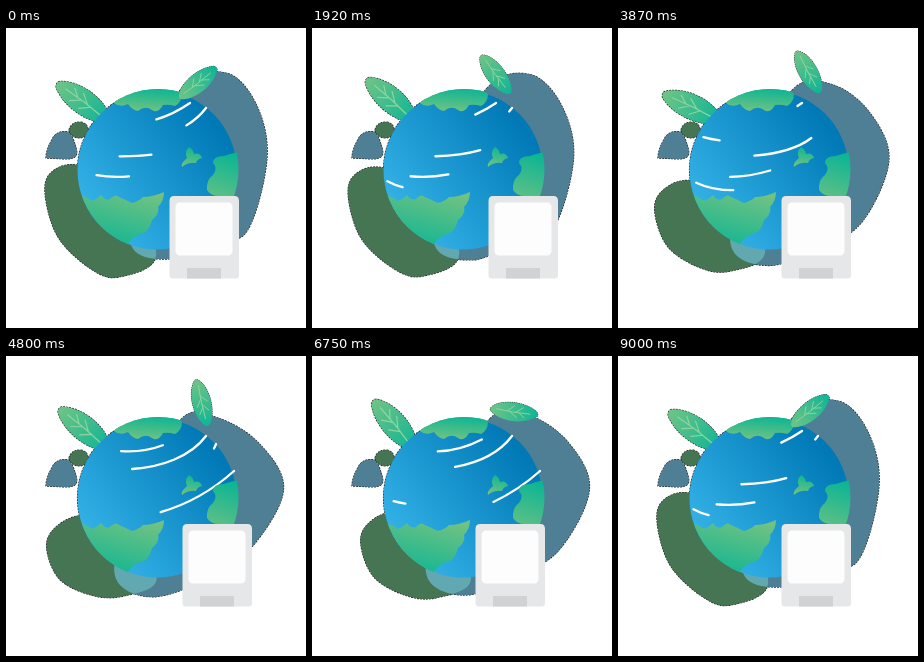
Recreate the animation shown at these times as an HTML page. Size 300 by 300 pixels, loop 9.03 s.

```html
<!DOCTYPE html>
<html lang="en">
<head>
<meta charset="utf-8">
<title>Green planet</title>
<style>
html, body { margin: 0; width: 100%; height: 100%; overflow: hidden; background: #fff; }
svg { display: block; width: 100vw; height: 100vh; }
#winds path { fill: none; stroke: #fff; stroke-width: 2.3; stroke-linecap: round; }
.vein { fill: none; stroke: #8fd49c; stroke-width: 1.2; stroke-linecap: round; stroke-dasharray: none; }
</style>
</head>
<body>
<svg viewBox="0 0 300 300">
<defs>
  <linearGradient id="sea" x1=".08" y1=".8" x2=".85" y2=".2">
    <stop stop-color="#35b3e8"/><stop offset="1" stop-color="#0079b6"/>
  </linearGradient>
  <linearGradient id="south" x1=".75" y1="0" x2=".35" y2="1">
    <stop stop-color="#70c282"/><stop offset="1" stop-color="#0bb594"/>
  </linearGradient>
  <linearGradient id="north" x1=".6" y1="0" x2=".4" y2="1">
    <stop stop-color="#0bb594"/><stop offset="1" stop-color="#70c282"/>
  </linearGradient>
  <linearGradient id="leafA" x1="0" y1="0" x2="0" y2="1">
    <stop stop-color="#6fc486"/><stop offset="1" stop-color="#0eb596"/>
  </linearGradient>
  <linearGradient id="leafB" x1="0" y1="1" x2="0" y2="0">
    <stop stop-color="#6fc486"/><stop offset="1" stop-color="#0eb596"/>
  </linearGradient>
  <clipPath id="inGreen"><path id="greenClip"/></clipPath>
  <clipPath id="inGlobe"><circle cx="152" cy="141.5" r="80.5"/></clipPath>
  <path id="leaf" d="M0 0C-13-8-16-44-3-62Q1-65 4-62C17-45 16-13 3 0Z"/>
  <path id="veins" class="vein" d="M0-8Q2-30 1-53M1-22L-7-31M1-34L-6-43M1-26L8-36M1-38L7-46"/>
</defs>

<use href="#art" stroke="#222" stroke-width="1.2" stroke-dasharray="2 1"/>

<g id="art">
  <path fill="#4f7f95" d="M40 130Q40 121 48 108Q54 102 63 104Q69 112 71 125Q70 131 60 131Z"/>
  <path fill="#457552" d="M63 102Q65 94 75 94Q82 96 82 102Q80 109 74 110Q66 110 63 102Z"/>
  <path id="blue" fill="#4f7f95"/>
  <path id="green" fill="#457552"/>
  <path id="overlap" fill="#62a8b0" clip-path="url(#inGreen)" stroke="none"/>
  <g id="leftLeaf"><use href="#leaf" fill="url(#leafA)"/><use href="#veins"/></g>
  <circle cx="151" cy="142" r="79.5" fill="url(#sea)"/>
  <g id="winds"></g>
  <g clip-path="url(#inGlobe)" stroke="none">
    <path fill="url(#south)" d="M70 167Q80 168 86 173Q91 171 95 167Q99 173 104 171Q109 165 113 169Q118 171 126 175Q133 173 137 169Q147 169 158 164Q158 173 152 179Q154 186 146 192Q144 201 138 205Q126 208 122 216V222H70Z"/>
    <g fill="url(#north)">
      <path d="M108 75Q114 80 122 76Q126 82 132 83Q139 77 146 82Q152 86 157 77Q163 76 169 78Q176 74 176 66L170 60H120Z"/>
      <path d="M233 124Q223 126 218 128Q207 128 207 135Q212 140 207 147Q200 152 201 162Q205 168 213 168Q216 172 216 182H233Z"/>
      <path d="M183 119Q187 121 188 126Q194 124 196 130Q191 131 190 135Q182 134 176 139Q174 136 181 130Q178 124 183 119Z"/>
    </g>
  </g>
  <g id="rightLeaf"><g transform="translate(0 23.5) scale(.75)"><use href="#leaf" fill="url(#leafB)"/><use href="#veins"/></g></g>
</g>

<g id="computer">
  <path fill="#e6e7e8" d="M163.500 173Q163.500 168 168 168H228.500Q233 168 233 173V247Q233 250.500 229.500 250.500H167Q163.500 250.500 163.500 247Z"/>
  <rect x="169.500" y="174.500" width="57" height="53" rx="4.500" fill="#fdfdfd"/>
  <path fill="#d1d2d4" d="M181 240H215V250.500H181Z"/>
</g>
</svg>
<script>
const LOOP = 9030, WIND = 1770, STEP = 3000, REST = 8700;
const el = id => document.getElementById(id);
const { PI, sin, cos, min, max } = Math;
const ramp = (t, from, to) => min(1, max(0, (t - from) / (to - from)));
const mix = (a, b, u) => a + (b - a) * u;
const wave = (t, peak) => cos(2 * PI * (t - peak) / LOOP);

// Each blob: resting outline, stretched outline; the last point stays behind the globe.
const blue = [
  [176,60, 220,45, 250,76, 261,130, 241,203, 205,215, 163,231, 125,217, 130,145],
  [176,64, 212,64, 255,89, 281,133, 250,187, 205,222, 145,242, 108,218, 130,145]
];
const green = [
  [75,138, 47,143, 39,165, 52,209, 85,241, 113,249, 150,228, 125,165],
  [80,162, 54,175, 45,195, 58,225, 90,239, 122,239, 155,222, 125,165]
];

// Leaf angles by time
const leftTurn = [[0,-54], [1110,-44], [2730,-54], [3870,-65], [5820,-35], [REST,-54], [LOOP,-54]];
const rightTurn = [[0,51], [1110,106], [2730,180], [3870,151], [5820,184], [6600,100], [REST,52], [LOOP,51]];

// path, start, head duration, tail duration, tail power
const winds = [
  ["M94 91Q140 105 184 75", 450, 1200, 1700, 2],
  ["M85 109C120 119 176 112 200 80", 200, 960, 1750, 2.2],
  ["M100 128C148 130 196 124 210 88", 1480, 800, 1600, 1.3],
  ["M81 145C125 157 175 140 216 110", 1300, 1600, 1600, 2.2],
  ["M75 153C113 174 180 158 228 115", 30, 1200, 1700, 2.2]
].map(([d, ...timing]) => {
  const path = document.createElementNS("http://www.w3.org/2000/svg", "path");
  path.setAttribute("d", d);
  path.setAttribute("pathLength", 100);
  el("winds").append(path);
  return [path, ...timing];
});

function eased(keys, t) {
  const i = keys.findIndex(k => k[0] > t);
  const [from, a] = keys[i - 1], [to, b] = keys[i];
  const u = ramp(t, from, to);
  return mix(a, b, (u + u * u * (3 - 2 * u)) / 2);
}

// Closed smooth curve through a flat list of points
function smooth(flat) {
  const n = flat.length / 2;
  const at = i => [flat[(i + n) % n * 2], flat[(i + n) % n * 2 + 1]];
  let d = "M" + at(0);
  for (let i = 0; i < n; i++) {
    const [a, b, c, e] = [at(i - 1), at(i), at(i + 1), at(i + 2)];
    d += "C" + [b.map((v, j) => v + (c[j] - a[j]) / 6), c.map((v, j) => v - (e[j] - b[j]) / 6), c];
  }
  return d + "Z";
}

// Stretches once per loop, slowly out and quickly back, with a sideways sway
function blob([rest, stretched], t, sway) {
  const turn = PI * ramp(t, 0, REST) ** 1.57;
  return smooth(rest.map((v, i) =>
    mix(v, stretched[i], sin(turn) ** 2) - (i % 2 ? 0 : sway * sin(2 * turn))));
}

const move = (id, value) => el(id).setAttribute("transform", value);
const shape = (d, ...ids) => ids.forEach(id => el(id).setAttribute("d", d));

function draw(t) {
  shape(blob(blue, t, 2), "blue", "overlap");
  shape(blob(green, t, 6), "green", "greenClip");

  move("leftLeaf", `translate(102 93) rotate(${eased(leftTurn, t)})`);
  const x = 193 + 9 * wave(t, 6500), y = 50 + 7 * wave(t, 7800);
  move("rightLeaf", `translate(${x} ${y}) rotate(${eased(rightTurn, t)})`);

  const step = t % STEP;
  const shift = 13 * (ramp(step, 900, 1100) - ramp(step, 2400, STEP));
  const tilt = 10 * sin(PI * ramp(step, 1400, 1670));
  move("computer", `translate(${shift} 0) rotate(${tilt} 198 209)`);

  for (const [path, start, headTime, tailTime, power] of winds) {
    const age = (t - start + WIND) % WIND;
    const head = 100 * ramp(age, 0, headTime);
    const tail = 100 * ramp(age, 0, tailTime) ** power;
    const length = max(0, head - tail);
    path.style.display = length > .3 ? "" : "none";
    path.style.strokeDasharray = `${length} 300`;
    path.style.strokeDashoffset = -tail;
  }
}

const begin = performance.now();
function tick() {
  draw((performance.now() - begin) % LOOP);
  requestAnimationFrame(tick);
}
tick();
</script>
</body>
</html>
```
